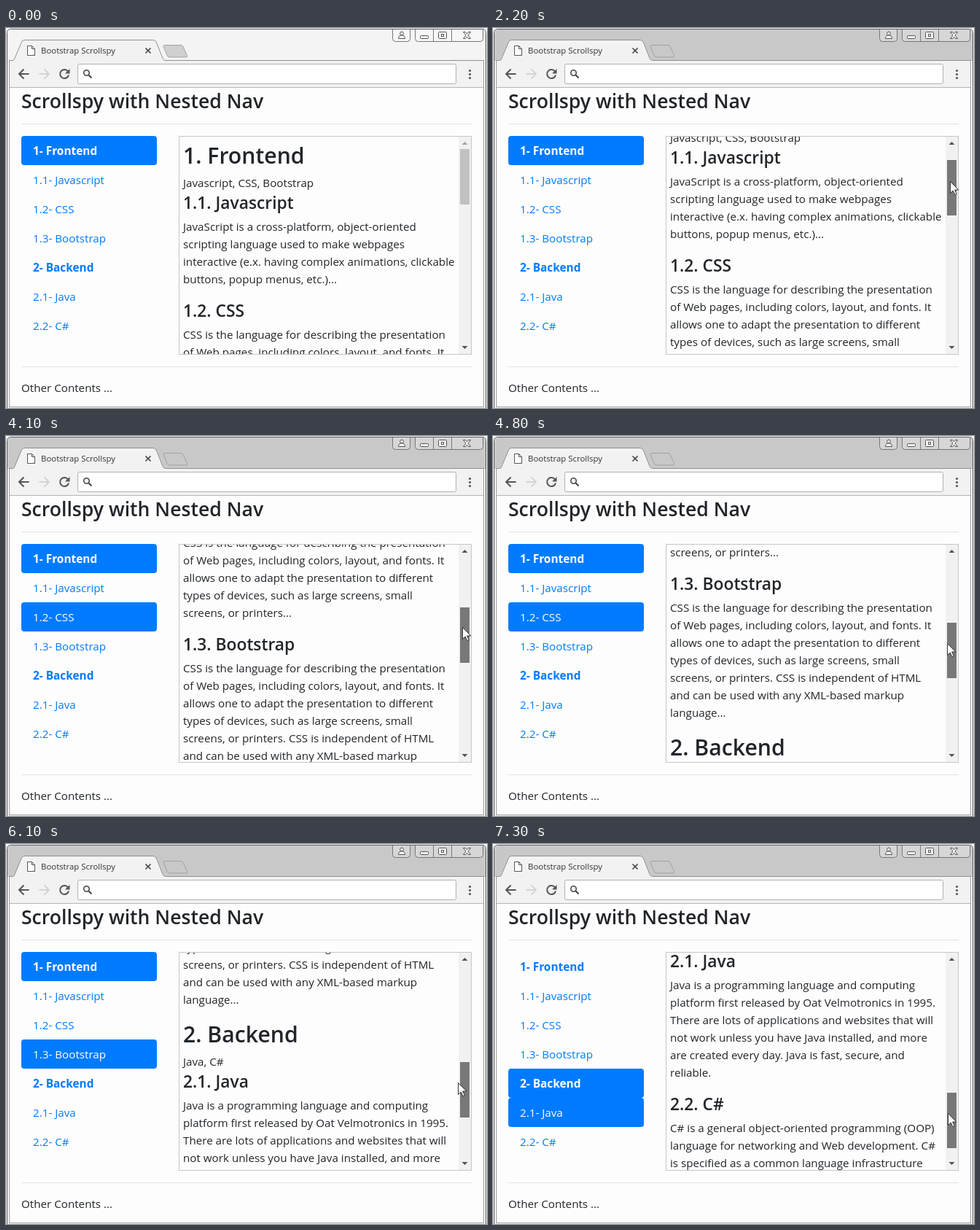
Animation of 660x521 px, one loop 8 s. Source, as an HTML page:

```html
<!DOCTYPE html>
<html lang="en">
<head>
<meta charset="utf-8">
<title>Scrollspy with Nested Nav</title>
<style>
  html, body { margin: 0; width: 100%; height: 100%; overflow: hidden; background: #fff; }
  svg { display: block; width: 660px; height: 521px; }
  text { font: 15.2px "Open Sans", "Noto Sans", sans-serif; fill: #212529; white-space: pre; }
  .h1 { font-size: 30.2px; font-weight: 600; }
  .h2 { font-size: 26.6px; font-weight: 600; }
  .h4 { font-size: 22.8px; font-weight: 600; }
  .tab { font-size: 11.4px; fill: #333; }
  .link rect { fill: none; }
  .link text { fill: #007bff; }
  .link.top text { font-weight: 700; font-size: 15.4px; }
  .link.on rect { fill: #007bff; }
  .link.on text { fill: #fff; }
  .line { fill: none; stroke: #555; stroke-width: 2; }
  .thin { fill: none; stroke: #777; }
</style>
</head>
<body>
<svg viewBox="0 0 660 521">
  <defs>
    <clipPath id="view"><rect x="238" y="149" width="383" height="298"/></clipPath>
  </defs>

  <!-- window frame -->
  <path d="M1.5 521V6.5q0-5 5-5H653.5q5 0 5 5V521" fill="#f4f4f4" stroke="#555"/>
  <path id="bar" d="M2 45V7q0-5 5-5H653q5 0 5 5V45Z"/>
  <rect x="5" y="44" width="650" height="476" fill="#fdfdfd"/>
  <rect x="5" y="44" width="650" height="37" fill="#f2f2f2"/>
  <path class="thin" d="M4.5 44V519.5H655.5V44" stroke-opacity=".7"/>
  <path d="M5 81.5H655" stroke="#b6b6b6"/>

  <!-- window buttons -->
  <g class="thin">
    <path d="M530.5 2V14.5q0 4 4 4H550.5q4 0 4-4V2M561.5 2V14.5q0 4 4 4H650.5q4 0 4-4V2M586.5 2V18M611.5 2V18" fill="#fff" fill-opacity=".25"/>
    <g stroke="#555" fill="#f4f4f4">
      <circle cx="543" cy="7.5" r="2.4"/>
      <path d="M538.5 14.5q0-4.5 4.5-4.5t4.5 4.5Z"/>
      <rect x="568.5" y="10.5" width="11" height="4" rx="1"/>
      <rect x="593.5" y="5.5" width="11" height="9" rx="1"/>
      <rect x="597.5" y="8.5" width="3" height="3"/>
      <path d="M627.5 5.5h3l2 2.5 2-2.5h3l-3.5 4.5 3.5 4.5h-3l-2-2.5-2 2.5h-3l3.5-4.5Z"/>
    </g>
  </g>

  <!-- tab strip -->
  <path d="M5 44.5H9q2 0 3-3L21 20q1-3.5 4-3.5H202q3 0 4.500 3.500L215 41.500q1.500 3 4 3H655" fill="#f2f2f2" stroke="#909090"/>
  <path id="plus" d="M217.5 23.5H240q2 0 3 2l5.5 12q1 2.500-1.500 2.500H224.500q-2.500 0-3.500-2.500l-5-12q-.5-2 1.500-2Z" stroke="#a2a2a2"/>
  <path d="M29.5 24.5h6l4 4v9h-10ZM35.5 24.5v4h4" fill="#fff" stroke="#555"/>
  <text class="tab" x="48" y="35">Bootstrap Scrollspy</text>
  <path d="M191.5 27.5l7 7m0-7l-7 7" stroke="#444" stroke-width="1.7"/>

  <!-- toolbar -->
  <path class="line" d="M24.5 56.5L18 63l6.5 6.5M18 63H31.5"/>
  <path class="line" d="M52.5 56.5L59 63l-6.5 6.5M59 63H45.5" style="stroke:#d4d4d4"/>
  <path class="line" d="M85 59.5A6 6 0 1 0 86 64.5"/>
  <path d="M87.5 56v6.5H81Z" fill="#555"/>
  <rect x="98.5" y="49.5" width="519" height="27" rx="2" fill="#fff" stroke="#b0b0b0"/>
  <circle cx="110.5" cy="61.5" r="3.7" fill="none" stroke="#444" stroke-width="1.6"/>
  <path d="M113.3 64.3l4.2 4.2" stroke="#444" stroke-width="2"/>
  <g fill="#555"><circle cx="636.5" cy="58.5" r="1.6"/><circle cx="636.5" cy="63.5" r="1.6"/><circle cx="636.5" cy="68.5" r="1.6"/></g>

  <!-- page -->
  <text class="h2" x="21" y="110">Scrollspy with Nested Nav</text>
  <path d="M21 131.5H639M21 464.5H639" stroke="#e3e3e3"/>
  <text x="21" y="499">Other Contents ...</text>
  <g id="nav"></g>
  <rect x="237.5" y="148.5" width="401" height="299" fill="none" stroke="#c6c6c6"/>
  <g clip-path="url(#view)"><g id="doc"></g></g>

  <!-- scrollbar -->
  <rect x="621" y="149" width="17" height="298" fill="#f1f1f1"/>
  <path id="up" d="M625.5 160h8l-4-4Z"/>
  <path d="M625.5 436h8l-4 4Z" fill="#505050"/>
  <rect id="thumb" x="623" width="13" height="76"/>
  <path id="pointer" d="M.5.5V16.5l3.700-3.500 2.700 5.700 2.400-1.100-2.700-5.600h5.200Z" fill="#fff" stroke="#333"/>
</svg>

<script>
const $ = id => document.getElementById(id);

const links = ['1- Frontend', '1.1- Javascript', '1.2- CSS', '1.3- Bootstrap',
  '2- Backend', '2.1- Java', '2.2- C#'];
$('nav').innerHTML = links.map((label, i) =>
  `<g class="link${i % 4 ? '' : ' top'}"><rect x="21" y="${148 + 40 * i}" width="186" height="40" rx="4"/>` +
  `<text x="37" y="${174 + 40 * i}">${label}</text></g>`).join('');
const items = [...$('nav').children];

// "# " marks a section, "## " a subsection, "> " the first line of a paragraph.
const doc = `# 1. Frontend
Javascript, CSS, Bootstrap
## 1.1. Javascript
> JavaScript is a cross-platform, object-oriented
scripting language used to make webpages
interactive (e.x. having complex animations, clickable
buttons, popup menus, etc.)...
## 1.2. CSS
> CSS is the language for describing the presentation
of Web pages, including colors, layout, and fonts. It
allows one to adapt the presentation to different
types of devices, such as large screens, small
screens, or printers...
## 1.3. Bootstrap
> CSS is the language for describing the presentation
of Web pages, including colors, layout, and fonts. It
allows one to adapt the presentation to different
types of devices, such as large screens, small
screens, or printers. CSS is independent of HTML
and can be used with any XML-based markup
language...
# 2. Backend
Java, C#
## 2.1. Java
> Java is a programming language and computing
platform first released by Oat Velmotronics in 1995.
There are lots of applications and websites that will
not work unless you have Java installed, and more
are created every day. Java is fast, secure, and
reliable.
## 2.2. C#
> C# is a general object-oriented programming (OOP)
language for networking and Web development. C#
is specified as a common language infrastructure`;

let y = 133, last = '';
$('doc').innerHTML = doc.split('\n').map(row => {
  const [, mark, label] = row.match(/^(#{1,2} |> )?(.*)$/);
  const kind = { '# ': 'h1', '## ': 'h4', '> ': 'p' }[mark] || (last === 'h1' ? 'sub' : 'p');
  y += kind === 'h1' ? 53 : kind === 'sub' ? 32 : kind === 'h4' ? (last === 'sub' ? 30 : 46) : last === 'h4' ? 30 : 24;
  last = kind;
  return `<text class="${kind}" x="243" y="${y}">${label}</text>`;
}).join('');

// Keys: time, then values.
const scrollKeys = [[1400, 0], [2200, 62], [3200, 152], [4100, 274], [4200, 284],
  [4300, 284], [5400, 445], [6100, 523], [7000, 688]];
const pointerKeys = [[500, 648, 63], [700, 637, 105], [1000, 609, 176], [1200, 627, 195],
  [1400, 627, 195], [2200, 627, 210], [3200, 627, 231], [4100, 626, 262], [4200, 626, 265],
  [4300, 626, 265], [5400, 620, 307], [6100, 620, 327], [7000, 624, 369]];

function at(keys, t) {
  const i = keys.findIndex(k => k[0] > t);
  if (i < 0) return keys[keys.length - 1].slice(1);
  if (!i) return keys[0].slice(1);
  const a = keys[i - 1], b = keys[i], f = (t - a[0]) / (b[0] - a[0]);
  return a.slice(1).map((v, j) => Math.round(v + (b[j + 1] - v) * f));
}

// Scroll positions where each link takes over.
const spots = [[0, 0], [67, 1], [215, 2], [387, 3], [606, 4], [676, 5]];

function draw(now) {
  const t = Math.floor(now % 8000 / 100) * 100;
  const [top] = at(scrollKeys, t), [px, py] = at(pointerKeys, t);
  const active = spots.filter(s => s[0] <= top).pop()[1];
  const parent = active < 4 ? 0 : 4;
  const pressed = t >= 1500; // the press also brings the window into focus
  items.forEach((el, i) => el.classList.toggle('on', i === active || i === parent));

  $('doc').setAttribute('transform', `translate(0 ${-top})`);
  $('thumb').setAttribute('y', 166 + Math.floor(top / 3.93));
  $('thumb').setAttribute('fill', pressed ? '#787878' : t >= 1200 ? '#a8a8a8' : '#c1c1c1');
  $('up').setAttribute('fill', top ? '#505050' : '#a3a3a3');
  $('bar').setAttribute('fill', pressed ? '#c8c8c8' : '#f4f4f4');
  $('plus').setAttribute('fill', pressed ? '#c8c8c8' : '#d0d0d0');
  $('pointer').setAttribute('transform', `translate(${px} ${py})`);
  $('pointer').setAttribute('visibility', t < 500 ? 'hidden' : 'visible');
}

const start = performance.now();
function loop() {
  draw(performance.now() - start);
  requestAnimationFrame(loop);
}
loop();
</script>
</body>
</html>
```
